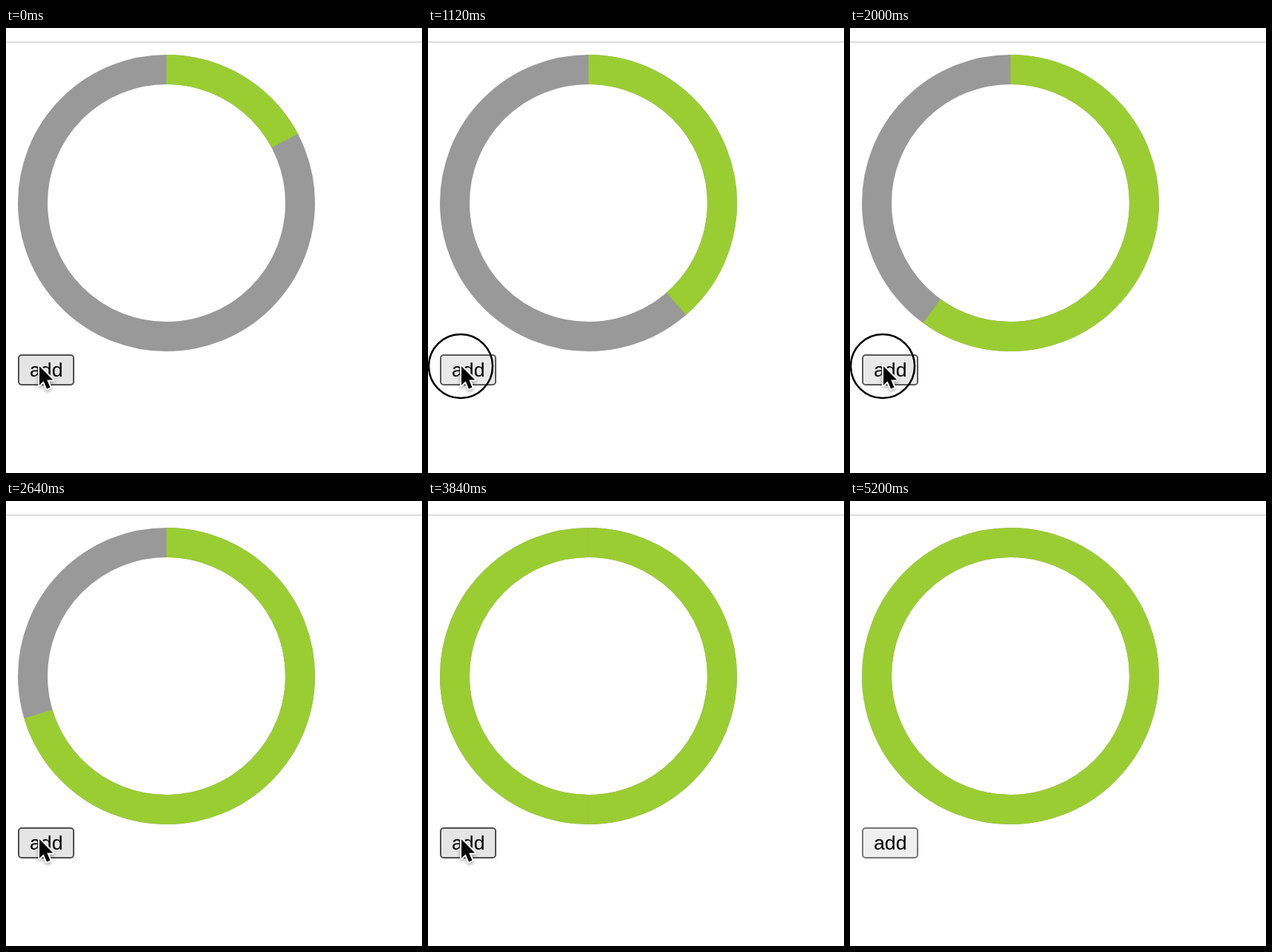
Animation, 560 px wide and 600 px high, one loop 5280 ms. Source, as an HTML page:

```html
<!DOCTYPE html>
<html lang="en">
<head>
<meta charset="utf-8">
<title>Ring progress</title>
<style>
  html, body { margin: 0; width: 100%; height: 100%; overflow: hidden; background: #fff; }
  svg { display: block; width: 560px; height: 600px; }
  text { font: 26.667px "Liberation Sans", Arial, sans-serif; }
</style>
</head>
<body>
<svg viewBox="0 0 560 600">
  <rect y="18" width="560" height="2" fill="#ddd"/>
  <g fill="none" stroke-width="40">
    <circle cx="216" cy="236" r="180" stroke="#999"/>
    <path id="right" stroke="#9acd32"/>
    <path id="left" stroke="#9acd32"/>
  </g>
  <path id="seam" d="M215.5 36V76M215.5 396V436" stroke="#999" stroke-opacity=".25"/>
  <rect id="button" x="17" y="441" width="74" height="40" rx="4" stroke-width="2"/>
  <text x="32" y="470">add</text>
  <circle id="press" cx="44" cy="456" r="43" fill="none" stroke="#000" stroke-width="2.5"/>
  <g id="cursor">
    <path d="M45 456V481.5L50.7 476.2L55 486.5L59.5 484.5L55.200 474.500H63.200Z"
      stroke="#fff" stroke-width="4" stroke-linejoin="round" paint-order="stroke"
      style="filter: drop-shadow(0 2px 2px rgba(0,0,0,.35))"/>
  </g>
</svg>
<script>
const LOOP = 5280, TICK = 80;
const STEP = 36, EASE_MS = 400, PRESS_MS = 160;
const CLICKS = [-291, 418, 770, 1171, 1450, 2030, 2624, 2920, 3085, 3400];
const LEAVE = 4560, GONE = 4640, SEAM_END = 5120;

const byId = id => document.getElementById(id);
const [right, left, seam, button, press, cursor] =
  ["right", "left", "seam", "button", "press", "cursor"].map(byId);
const clamp = (v, lo, hi) => Math.min(hi, Math.max(lo, v));
const show = (el, on) => el.setAttribute("visibility", on ? "visible" : "hidden");

// Each half has its own transition, retargeted from its current angle on a click.
function halfAngle(t, base) {
  const target = n => clamp(n * STEP - base, 0, 180);
  let from = target(1), to = from, start = -LOOP;
  const at = time => from + (to - from) * clamp((time - start) / EASE_MS, 0, 1);
  CLICKS.forEach((click, i) => {
    const next = target(i + 2);
    if (click > t || next === to) return;
    from = at(click);
    to = next;
    start = click;
  });
  return at(t);
}

function point(deg) {
  const a = deg * Math.PI / 180;
  return `${216 + 180 * Math.sin(a)} ${236 - 180 * Math.cos(a)}`;
}

function drawHalf(path, base, angle) {
  path.setAttribute("d", angle > 0
    ? `M${point(base)}A180 180 0 0 1 ${point(base + angle)}` : "");
}

function render(t) {
  const a = halfAngle(t, 0), b = halfAngle(t, 180);
  const pressed = CLICKS.some(c => t >= c - PRESS_MS && t < c);
  const hover = t < LEAVE;
  drawHalf(right, 0, a);
  drawHalf(left, 180, b);
  show(seam, a + b === 360 && t < SEAM_END);
  show(press, pressed);
  show(cursor, t < GONE);
  cursor.setAttribute("transform", `translate(0 ${hover ? 0 : 35})`);
  button.setAttribute("fill", pressed ? "#e9e9e9" : hover ? "#e5e5e5" : "#efefef");
  button.setAttribute("stroke", pressed ? "#5a5a5a" : hover ? "#4f4f4f" : "#767676");
}

const origin = performance.now();
function frame() {
  const t = (performance.now() - origin) % LOOP;
  render(Math.floor(t / TICK) * TICK);
  requestAnimationFrame(frame);
}
frame();
</script>
</body>
</html>
```
